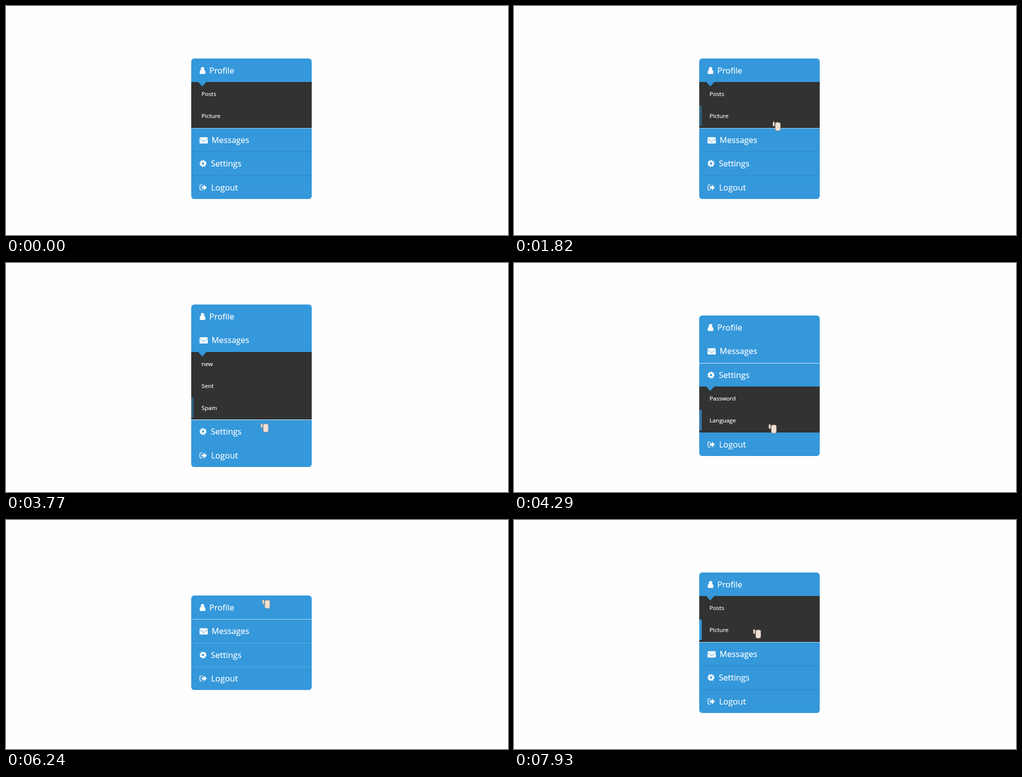
These frames come from a looping animation (1000 px wide and 458 px high, 8000 ms). An HTML page:

```html
<!DOCTYPE html>
<html lang="en">
<head>
<meta charset="utf-8">
<title>Accordion menu</title>
<style>
html, body { margin: 0; width: 100%; height: 100%; overflow: hidden; background: #fefefe; }
body { position: relative; font-family: "Open Sans", "Noto Sans", sans-serif; color: #fff; -webkit-text-stroke: .2px #fff; }
.menu { position: absolute; left: 369px; width: 240px; border-radius: 6px; overflow: hidden; background: #3498db; }
.head { position: relative; height: 47.4px; line-height: 47.8px; font-size: 16.5px; }
.head svg { position: absolute; left: .5px; top: 0; }
.head span { position: absolute; white-space: nowrap; }
.sub { position: relative; overflow: hidden; background: #313232; font-size: 11.6px; line-height: 44px; }
.sub::before { content: ""; position: absolute; left: 14px; top: 0; border: 8px solid transparent; border-top: 9px solid #3498db; border-bottom: 0; }
.item { position: absolute; left: 0; height: 44px; padding-left: 20.6px; }
.bar { position: absolute; left: 0; top: 1px; width: 5px; height: 41px; background: #3498db; }
#cursor { position: absolute; left: 0; top: 0; }
</style>
</head>
<body>
<div class="menu" id="menu"></div>
<svg id="cursor" width="17" height="20">
  <g fill="#efdfd3" stroke="#8a7a70" stroke-width=".7">
    <rect x=".6" y=".6" width="3.6" height="9" rx="1.7"/>
    <rect x="5.4" y="1.8" width="10.4" height="16.6" rx="3.4"/>
  </g>
</svg>
<script>
const LOOP = 8000, STEP = 130, FADE = 300;
const HEAD = 47.4, ITEM = 44, PAD = 3.8, MAX = 153.5, CENTER = 245.6;

const sections = [
  { name: 'Profile', x: 36, items: ['Posts', 'Picture'],
    icon: '<circle cx="21.5" cy="20.5" r="3.5"/><path d="M15.7 28.3c0-3 .8-5.4 3.2-5.6 1.6 1.5 3.6 1.5 5.2 0 2.4.2 3.2 2.6 3.2 5.6q0 2.6-2.4 2.6h-6.8q-2.4 0-2.4-2.6z"/>' },
  { name: 'Messages', x: 40.5, items: ['new', 'Sent', 'Spam'],
    icon: '<rect x="15.5" y="18.5" width="16.5" height="12.6" rx="1.6"/><path d="M15 21l7 5.2q1.7 1.2 3.4 0l7-5.2" fill="none" stroke="#3498db"/>' },
  { name: 'Settings', x: 39, items: ['Password', 'Language'],
    icon: '<g fill="none" stroke="#fff"><circle cx="22.5" cy="24" r="3.9" stroke-width="3.4"/><circle cx="22.5" cy="24" r="6" stroke-width="2.2" pathLength="16" stroke-dasharray="1.1 .9"/></g>' },
  { name: 'Logout', x: 39.5, items: [],
    icon: '<path d="M21.5 18.9h-3.2q-2 0-2 2v6.2q0 2 2 2h3.2" fill="none" stroke="#fff" stroke-width="1.4"/><path d="M20 21.8h4.2v-3.6l6 5.8-6 5.8v-3.6H20z"/>' }
];

// Time of the click that opens each section; Profile starts open
const clicks = [[-FADE, 0], [2680, 1], [3980, 2], [5380, 3], [6580, 0]];

// Pointer moves: [start, end, x, y], resting in between
const entry = [629, 443];
const moves = [[910, 1820, 515, 231], [1820, 2470, 505, 270.5], [2860, 3900, 507, 322],
  [4300, 5200, 513, 359], [5850, 6240, 510, 158.5], [6890, 7930, 476, 218]];

const menu = document.getElementById('menu');
const cursor = document.getElementById('cursor');
const clamp = v => Math.max(0, Math.min(1, v));
const sine = k => (1 - Math.cos(Math.PI * k)) / 2;

function add(parent, cls, html = '') {
  const el = document.createElement('div');
  el.className = cls;
  el.innerHTML = html;
  return parent.appendChild(el);
}

const bars = [];
sections.forEach((s, section) => {
  s.full = s.items.length && s.items.length * ITEM + PAD;
  s.head = add(menu, 'head', `<svg width="40" height="47" fill="#fff">${s.icon}</svg><span style="left:${s.x}px">${s.name}</span>`);
  s.sub = add(menu, 'sub');
  s.items.forEach((text, i) => {
    const item = add(s.sub, 'item', text), top = 2 + ITEM * i;
    item.style.top = top + 'px';
    bars.push({ el: add(item, 'bar'), section, top, level: 0, levels: [] });
  });
});

// CSS "ease": cubic-bezier(.25, .1, .25, 1)
function ease(x) {
  const bez = (a, b, u) => 3 * a * u * (1 - u) ** 2 + 3 * b * u * u * (1 - u) + u ** 3;
  let lo = 0, hi = 1;
  for (let i = 0; i < 20; i++) {
    const mid = (lo + hi) / 2;
    if (bez(.25, .25, mid) < x) lo = mid; else hi = mid;
  }
  return bez(.1, 1, lo);
}

// Submenu heights and menu top; max-height swaps between two submenus
function layout(t) {
  const n = clicks.findLastIndex(c => c[0] <= t);
  const [start, current] = clicks[n];
  const previous = n ? clicks[n - 1][1] : -1;
  const e = ease(clamp((t - start) / FADE));
  const heights = sections.map((s, i) =>
    Math.min(s.full, MAX * (i === current ? e : i === previous ? 1 - e : 0)));
  const total = heights.reduce((a, b) => a + b, 4 * HEAD);
  return { current, heights, top: CENTER - total / 2 };
}

function pointer(t) {
  let [x, y] = entry;
  for (const [start, end, toX, toY] of moves) {
    const k = sine(clamp((t - start) / (end - start)));
    x += (toX - x) * k;
    y += (toY - y) * k;
  }
  return { x, y, shown: t >= moves[0][0] };
}

function hovered(bar, t) {
  const { heights, top } = layout(t), { y, shown } = pointer(t);
  const above = heights.slice(0, bar.section).reduce((a, b) => a + b, 0);
  const inSub = y - (top + above + (bar.section + 1) * HEAD);
  return shown && inSub >= bar.top && inSub < Math.min(bar.top + ITEM, heights[bar.section]);
}

// Hover fades depend on the past, so run them once through the loop
const TICK = 10;
for (let t = 0; t < LOOP; t += TICK) {
  for (const b of bars) {
    if (t % STEP === 0) b.levels.push(b.level);
    b.level = clamp(b.level + (hovered(b, t) ? TICK : -TICK) / FADE);
  }
}

function draw(step) {
  const t = step * STEP, { current, heights, top } = layout(t), p = pointer(t);
  menu.style.top = top + 'px';
  sections.forEach((s, i) => s.sub.style.height = heights[i] + 'px');

  const moving = heights.filter(h => h > 0).length > 1;
  const faint = current % 2 ? 'rgba(255,255,255,.2)' : 'rgba(25,100,160,.35)';
  const lines = moving ? ['transparent', 'rgba(255,255,255,.85)', 'transparent']
    : ['rgba(255,255,255,.6)', faint, faint];
  lines.forEach((c, i) => sections[i + 1].head.style.boxShadow = `inset 0 1px ${c}`);

  for (const b of bars) b.el.style.opacity = b.levels[step];
  cursor.style.visibility = p.shown ? 'visible' : 'hidden';
  cursor.style.transform = `translate(${p.x}px, ${p.y}px)`;
}

const begin = performance.now();
function tick() {
  draw(Math.floor(Math.max(0, performance.now() - begin) % LOOP / STEP));
  requestAnimationFrame(tick);
}
tick();
</script>
</body>
</html>
```
